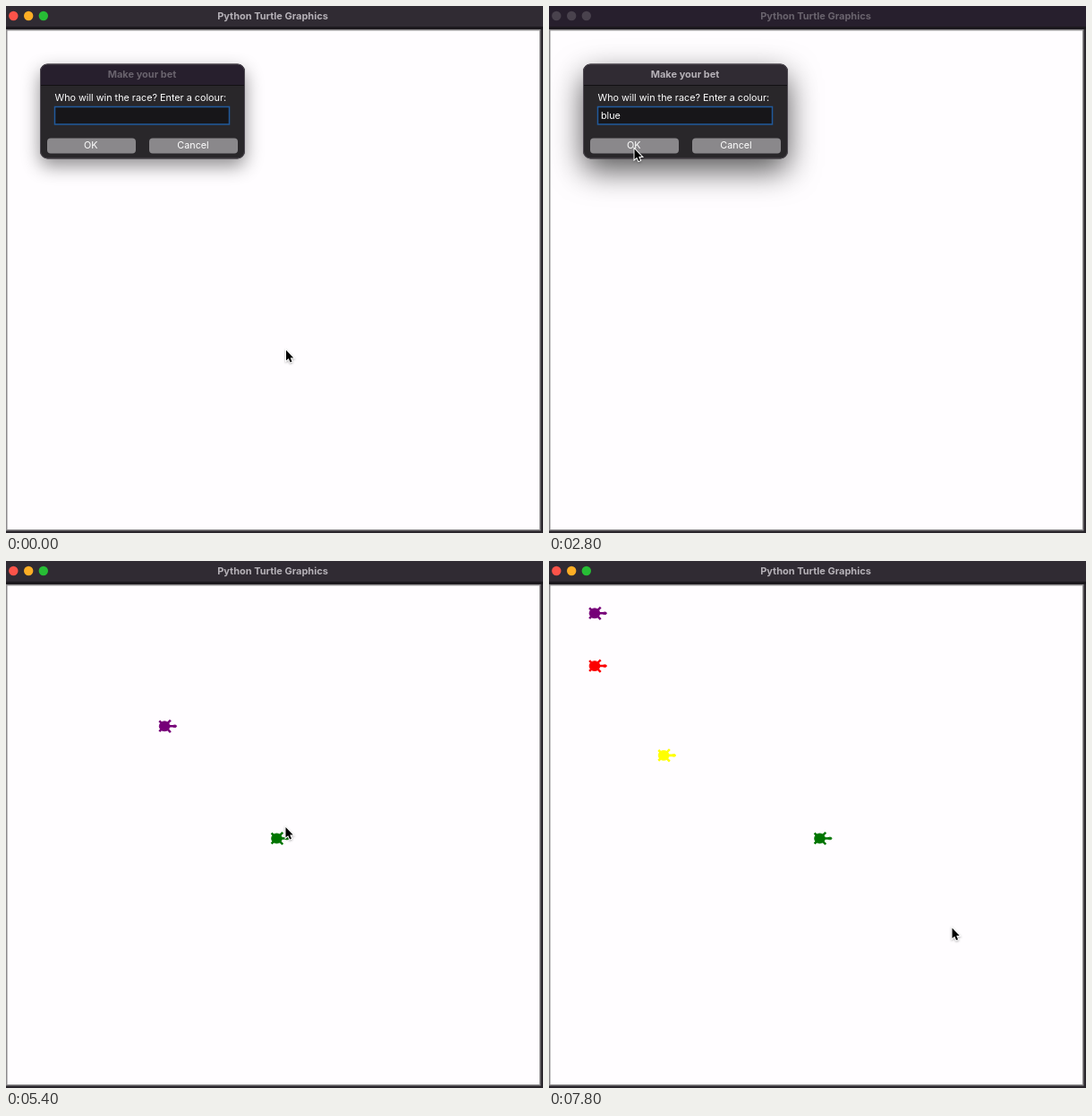
Write an HTML page that moves like this. It is 600 by 588 pixels and loops after 8 s.

```html
<!DOCTYPE html>
<html lang="en">
<head>
<meta charset="utf-8">
<title>Turtle race</title>
<style>
  html, body { margin: 0; width: 100%; height: 100%; overflow: hidden; background: #29252b; }
  svg { display: block; width: 600px; height: 588px; }
  text { font: 400 10.8px Inter, "Open Sans", sans-serif; fill: #fff; white-space: pre; }
  .mid { text-anchor: middle; }
  .bar { fill: #302b33; }
  .title { font-weight: 700; font-size: 11px; fill: #b5b1b7; }
  .idle .bar { fill: #271f2d; }
  .idle .title { fill: #69636d; }
  .idle .light { fill: #49424d; }
  #frame { filter: drop-shadow(0 13px 17px rgba(0, 0, 0, .66)); }
  .idle #frame { filter: drop-shadow(0 8px 10px rgba(0, 0, 0, .44)); }
  .button { fill: #8a888b; }
  .pressed { fill: url(#press); }
</style>
</head>
<body>
<svg viewBox="0 0 600 588">
  <defs>
    <linearGradient id="press" x2="0" y2="1">
      <stop stop-color="#1d7dff"/>
      <stop offset="1" stop-color="#0463fb"/>
    </linearGradient>
    <g id="turtle" transform="scale(.84)" fill="currentColor" stroke="currentColor">
      <ellipse rx="7" ry="6.5"/>
      <path d="M-7-7L8 8M-7 7L8-8M0 0H12" stroke-width="3"/>
      <ellipse cx="13.5" rx="2.5" ry="1.6"/>
    </g>
  </defs>

  <g id="main">
    <rect width="600" height="588" fill="#29252b"/>
    <rect class="bar" width="600" height="23"/>
    <rect y="23" width="600" height="3" fill="#1b181d"/>
    <circle class="light" cx="8.3" cy="11" r="5.2" fill="#fc5349"/>
    <circle class="light" cx="25.2" cy="11" r="5.2" fill="#fdae25"/>
    <circle class="light" cx="41.8" cy="11" r="5.2" fill="#27bd35"/>
    <text class="title mid" x="298" y="14.5">Python Turtle Graphics</text>
    <rect y="26" width="597.5" height="559.5" fill="#8b898b"/>
    <rect x="1.5" y="27.5" width="594.5" height="556.5" fill="#fffdff"/>
  </g>

  <g id="turtles"></g>

  <g id="dialog">
    <rect id="frame" x="38" y="64.5" width="229" height="106" rx="8.5" fill="#29272a"/>
    <path class="bar" d="M38.5 88V73q0-8 8-8h212q8 0 8 8V88z"/>
    <rect x="38.5" y="88" width="228" height="1" fill="#121013"/>
    <rect x="38.5" y="65" width="228" height="105" rx="8" fill="none" stroke="#4e4951"/>
    <text class="title mid" x="152" y="80">Make your bet</text>
    <text class="mid" x="150.3" y="106">Who will win the race? Enter a colour:</text>
    <rect x="54.5" y="112.5" width="195" height="19.5" fill="#171619" stroke="#215a9c" stroke-width="1.5"/>
    <text id="entry" x="58" y="126"></text>
    <rect id="caret" y="116" width="1" height="13.5" fill="#fff"/>
    <rect id="ok" class="button" x="46" y="147.5" width="99" height="17" rx="4"/>
    <text class="mid" x="94.8" y="159.2">OK</text>
    <rect class="button" x="160" y="147.5" width="99" height="17" rx="4"/>
    <text class="mid" x="209" y="159.2">Cancel</text>
  </g>

  <path id="cursor" d="M0 0V11.6L2.7 9.2L4.6 13.5L6.5 12.7L4.7 8.5H8.2Z"
        stroke="#fff" stroke-width="2" paint-order="stroke"
        style="filter:drop-shadow(0 1px 1px rgba(0,0,0,.3))"/>
</svg>
<script>
const LOOP = 8000, TICK = 200;
const FOCUS = 2600, PRESS = 4200, CLOSE = 4400, HATCH = 4600, WALK = 4786;
const SPEED = 0.2885; // px per ms
const HOME = [302.5, 309.5];

// Key poses of the pointer: time, x, y
const pointerPath = [
  [2000, 313, 384], [2700, 95.5, 159.5], [2800, 95.5, 159.5], [3500, 330, 180],
  [PRESS, 108, 158], [CLOSE, 108, 158], [5400, 312.5, 297],
  [6600, 427, 374], [7000, 427, 384], [7800, 450.5, 409.5]
];

const $ = id => document.getElementById(id);
const clamp = (v, lo, hi) => Math.min(hi, Math.max(lo, v));
const mix = (a, b, k) => a + (b - a) * k;
const ease = k => k * k * (3 - 2 * k);
const place = (el, x, y) => el.setAttribute('transform', `translate(${x} ${y})`);
const show = (el, on) => { el.style.display = on ? '' : 'none'; };

function addTurtle(color) {
  const el = document.createElementNS('http://www.w3.org/2000/svg', 'use');
  el.setAttribute('href', '#turtle');
  el.style.color = color;
  place(el, ...HOME);
  $('turtles').append(el);
  return el;
}

// Racers walk to their lanes one after another at the same speed.
let free = WALK;
const racers = ['#760078', '#fc0000', '#ffff00'].map((color, i) => {
  const lane = [51, 58.3 + 58.8 * i];
  const from = free;
  const duration = Math.hypot(HOME[0] - lane[0], HOME[1] - lane[1]) / SPEED;
  free += duration;
  return { el: addTurtle(color), lane, from, duration };
});
addTurtle('#007400'); // still waiting at home

function pointerAt(t) {
  const next = pointerPath.findIndex(p => p[0] > t);
  const i = next < 0 ? pointerPath.length - 1 : Math.max(next, 1);
  const [t0, x0, y0] = pointerPath[i - 1], [t1, x1, y1] = pointerPath[i];
  const k = ease(clamp((t - t0) / (t1 - t0), 0, 1));
  return [mix(x0, x1, k), mix(y0, y1, k)];
}

function draw(time) {
  const t = Math.floor(time % LOOP / TICK) * TICK;
  const dialogActive = t >= FOCUS && t < CLOSE;
  $('main').classList.toggle('idle', dialogActive);
  $('dialog').classList.toggle('idle', !dialogActive);
  show($('dialog'), t < CLOSE);
  $('ok').classList.toggle('pressed', t >= PRESS);

  const entry = $('entry');
  entry.textContent = 'blue'.slice(0, clamp((t - 800) / TICK, 0, 4));
  if (t < CLOSE) $('caret').setAttribute('x', 58 + entry.getComputedTextLength());
  // Blink: 600 ms on, 300 ms off
  show($('caret'), t < PRESS && (t + 700) % 900 < 600);

  show($('turtles'), t >= HATCH);
  for (const { el, lane, from, duration } of racers) {
    const k = clamp((t - from) / duration, 0, 1);
    show(el, k > 0);
    place(el, mix(HOME[0], lane[0], k), mix(HOME[1], lane[1], k));
  }
  place($('cursor'), ...pointerAt(t));
}

const start = performance.now();
(function frame() {
  draw(performance.now() - start);
  requestAnimationFrame(frame);
})();
</script>
</body>
</html>
```
